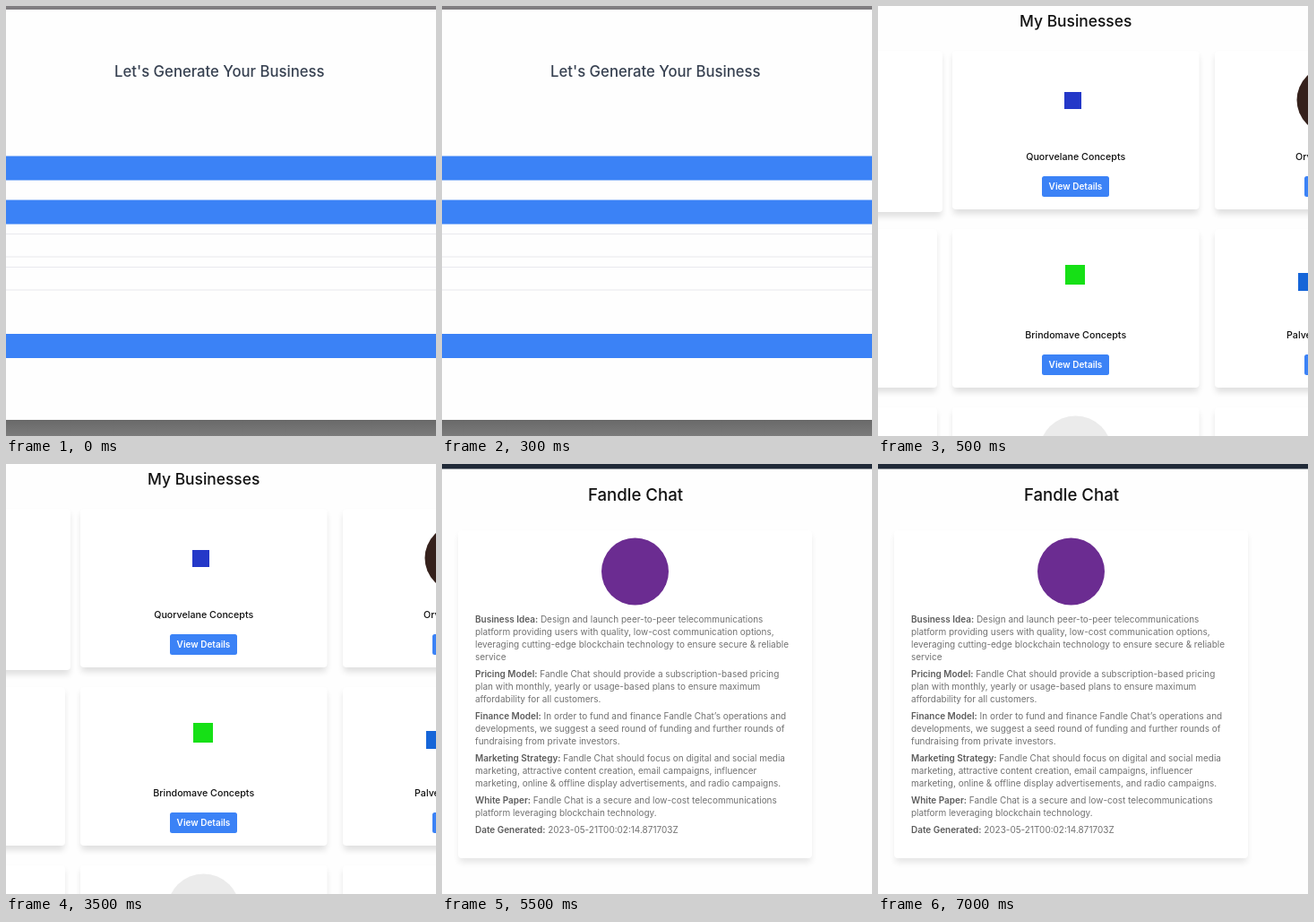
Animation of 480 by 480 pixels, one loop 8 s. Source, as an HTML page:

```html
<!DOCTYPE html>
<html lang="en">
<head>
<meta charset="utf-8">
<title>Business generator</title>
<style>
html, body { margin: 0; width: 100%; height: 100%; overflow: hidden; background: #fff; }
svg { display: block; width: 100vw; height: 100vh; }
text { font-family: Inter, "Open Sans", sans-serif; }
</style>
</head>
<body>
<svg id="stage" viewBox="0 0 480 480">
  <defs>
    <filter id="soft" x="-20%" y="-20%" width="140%" height="140%">
      <feGaussianBlur stdDeviation="3.5"/>
    </filter>
    <linearGradient id="shade" x1="0" y1="0" x2="0" y2="1">
      <stop offset="0" stop-color="#696969"/>
      <stop offset="1" stop-color="#7b7b7b"/>
    </linearGradient>
  </defs>
</svg>
<script>
const BLUE = '#3b82f6';
const LOOP = 8000;
const stage = document.getElementById('stage');

function add(parent, tag, attrs, content) {
  const el = document.createElementNS('http://www.w3.org/2000/svg', tag);
  for (const key in attrs) el.setAttribute(key, attrs[key]);
  if (content) el.textContent = content;
  parent.appendChild(el);
  return el;
}

function rect(g, x, y, width, height, fill, rx = 0) {
  return add(g, 'rect', { x, y, width, height, fill, rx });
}

function circle(g, cx, cy, r, fill) {
  return add(g, 'circle', { cx, cy, r, fill });
}

function label(g, x, y, size, content, fill = '#111', weight = 500, anchor = 'middle') {
  return add(g, 'text', {
    x, y, fill, 'font-size': size, 'font-weight': weight, 'text-anchor': anchor
  }, content);
}

function card(g, x, y, w, h, depth) {
  const shadow = rect(g, x + 1, y + 5, w - 2, h, '#000', 3);
  shadow.setAttribute('opacity', depth);
  shadow.setAttribute('filter', 'url(#soft)');
  rect(g, x, y, w, h, '#fff', 4);
}

function button(g, cx, y) {
  rect(g, cx - 37.5, y, 75, 23, BLUE, 2.5);
  label(g, cx, y + 14.7, 10, 'View Details', '#fff', 600);
}

function scene() {
  const g = add(stage, 'g', { display: 'none' });
  rect(g, 0, 0, 480, 480, '#fefefe');
  return g;
}

function buildForm() {
  const g = scene();
  rect(g, 0, 0, 480, 4, '#7f7d80');
  rect(g, 0, 462, 480, 18, 'url(#shade)');
  label(g, 238.3, 78.5, 16.7, "Let's Generate Your Business", '#374151');
  for (const y of [167.5, 216.5, 366]) rect(g, 0, y, 480, 27, BLUE);
  for (const y of [254, 279.5, 291, 316.5]) rect(g, 0, y, 480, 1, '#e9e9ee');
  return g;
}

function buildList() {
  const g = scene();
  label(g, 220.7, 23, 17.4, 'My Businesses');

  card(g, -210, 50, 282, 180, 0.12);
  for (const y of [249, 448]) card(g, -210, y, 276, 177, 0.12);
  for (const y of [50, 249, 448]) {
    card(g, 83, y, 275.5, 177, 0.12);
    card(g, 376, y, 275.5, 177, 0.12);
  }

  rect(g, 208, 96, 19, 19, '#2438c8');
  rect(g, 209, 289, 22, 22, '#16e016');
  circle(g, 505, 105, 37.5, '#35211c');
  rect(g, 469, 298, 20, 20, '#1565d8');
  circle(g, 220.5, 498, 40.5, '#ebebeb');

  label(g, 220.7, 172, 10.7, 'Quorvelane Concepts');
  label(g, 220.7, 371, 10.7, 'Brindomave Concepts');
  label(g, 466, 172, 10.7, 'Orvelane', '#111', 500, 'start');
  label(g, 456, 371, 10.7, 'Palvento', '#111', 500, 'start');
  for (const y of [190, 389]) {
    button(g, 220.5, y);
    button(g, 513.5, y);
  }
  return g;
}

const details = [
  ['Business Idea:', 177,
    'Design and launch peer-to-peer telecommunications',
    'platform providing users with quality, low-cost communication options,',
    'leveraging cutting-edge blockchain technology to ensure secure & reliable',
    'service'],
  ['Pricing Model:', 238,
    'Fandle Chat should provide a subscription-based pricing',
    'plan with monthly, yearly or usage-based plans to ensure maximum',
    'affordability for all customers.'],
  ['Finance Model:', 285,
    'In order to fund and finance Fandle Chat’s operations and',
    'developments, we suggest a seed round of funding and further rounds of',
    'fundraising from private investors.'],
  ['Marketing Strategy:', 332,
    'Fandle Chat should focus on digital and social media',
    'marketing, attractive content creation, email campaigns, influencer',
    'marketing, online & offline display advertisements, and radio campaigns.'],
  ['White Paper:', 379,
    'Fandle Chat is a secure and low-cost telecommunications',
    'platform leveraging blockchain technology.'],
  ['Date Generated:', 412, '2023-05-21T00:02:14.871703Z']
];

function buildDetails() {
  const g = scene();
  rect(g, 0, 0, 480, 5.5, '#1f2937');
  label(g, 216, 41, 18.6, 'Fandle Chat');
  card(g, 18, 74, 395, 366, 0.09);
  circle(g, 215.5, 120, 37.5, '#6b2c91');
  for (const [name, top, ...lines] of details) {
    lines.forEach((line, i) => {
      const row = label(g, 37, top + 0.4 + i * 14, 9.97, '', '#717171', 400, 'start');
      if (i === 0) add(row, 'tspan', { 'font-weight': 600, fill: '#5c5c5c' }, name);
      add(row, 'tspan', {}, i === 0 ? ' ' + line : line);
    });
  }
  return g;
}

const scenes = [
  { start: 0, node: buildForm() },
  { start: 500, node: buildList() },
  { start: 5500, node: buildDetails() }
];

function draw(time) {
  const t = time % LOOP;
  scenes.forEach(({ start, node }, i) => {
    const end = i + 1 < scenes.length ? scenes[i + 1].start : LOOP;
    node.setAttribute('display', t >= start && t < end ? 'inline' : 'none');
  });
}

const begin = performance.now();
function tick() {
  draw(performance.now() - begin);
  requestAnimationFrame(tick);
}
tick();
</script>
</body>
</html>
```
